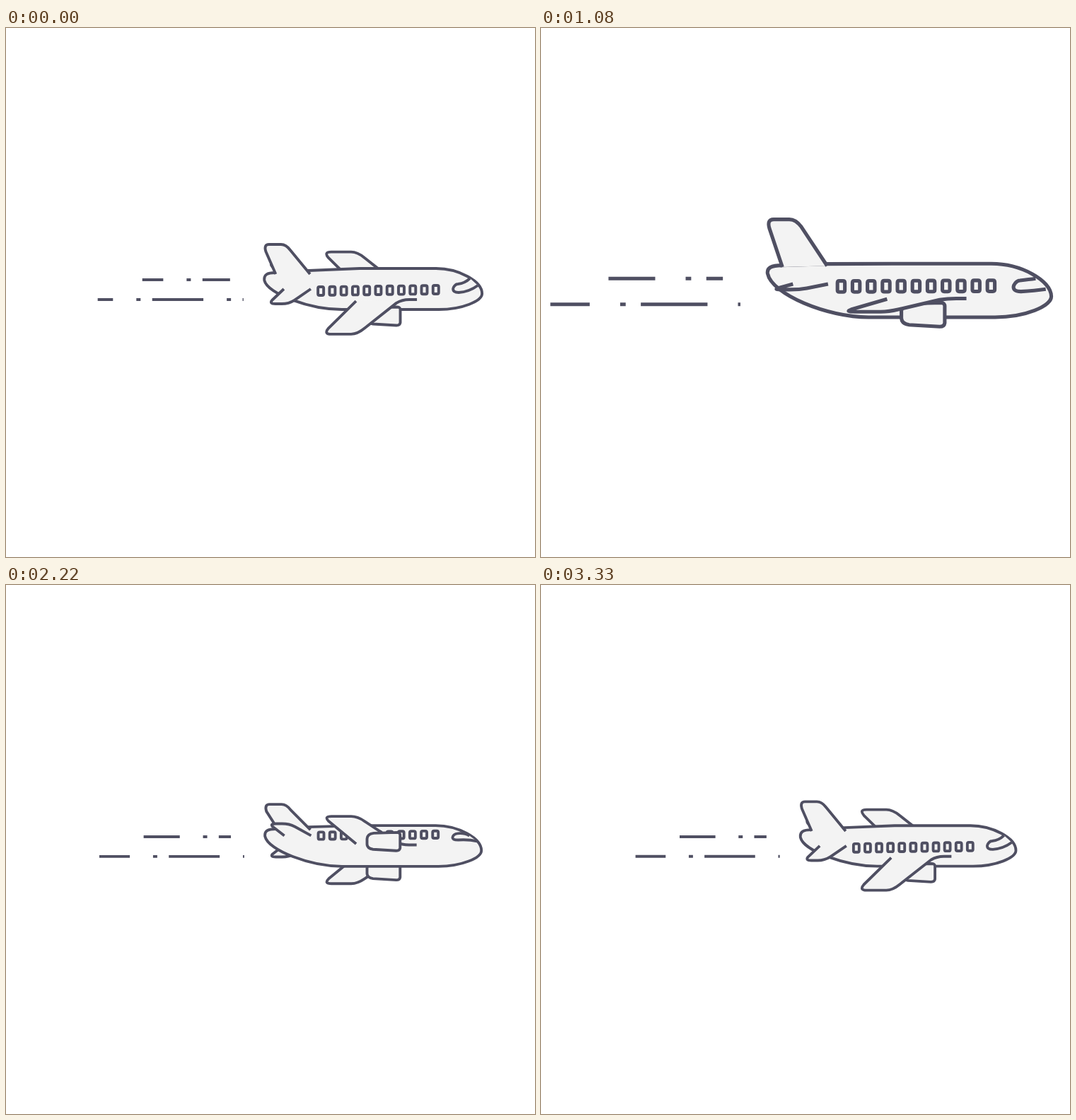
An HTML page that plays this animation: 748 by 748 pixels, repeating every 3360 ms.

```html
<!DOCTYPE html>
<html>
<head>
<meta charset="utf-8">
<title>Plane</title>
<style>
  html, body { margin: 0; height: 100%; overflow: hidden; background: #fff; }
  svg { display: block; width: 100%; height: 100%; }
  path { fill: #f3f3f3; stroke: #4f4f62; stroke-width: 3.9; stroke-linejoin: round; }
  .trail { stroke-dasharray: 72.3 33 6 16.4; }
</style>
</head>
<body>
<svg viewBox="0 0 748 748"><g id="plane"></g></svg>
<script>
const LOOP = 3360, HALF = LOOP / 2, LEVEL = 1290;
const plane = document.getElementById('plane');

function addPath(className = '') {
  const path = document.createElementNS('http://www.w3.org/2000/svg', 'path');
  path.setAttribute('class', className);
  plane.append(path);
  return path;
}

const upperTrail = addPath('trail'), lowerTrail = addPath('trail');
upperTrail.setAttribute('d', 'M193,356H317');
lowerTrail.setAttribute('d', 'M130,384H336');
const layers = Array.from({ length: 10 }, () => addPath());

// Cubic bezier timing (x1, 0, x2, 1), solved by bisection
function ease(x, x1 = 0.48, x2 = 0.52) {
  let lo = 0, hi = 1, t = 0.5;
  for (let i = 0; i < 22; i++) {
    t = (lo + hi) / 2;
    const guess = 3 * t * (1 - t) * ((1 - t) * x1 + t * x2) + t ** 3;
    if (guess < x) lo = t; else hi = t;
  }
  return t * t * (3 - 2 * t);
}

// Different reach for positive and negative roll
const reach = (q, up, down) => q * (q > 0 ? up : down);

function body(k) {
  return `M500,340H608C640,340 673,358 673,375.5C673,386 645,398 612,398H475
    C430,398 370,${372 + 4 * k} 365.5,${348 + 9 * k}
    C364.5,${343 + 6 * k} 369,${340 + 6 * k} 381,${340 + 6 * k}
    L428,${340 + 3 * k * k}Z`;
}

function cabin(q, k) {
  const h = 12 - 2 * Math.max(0, -q);
  let d = '';
  for (let i = 0; i < 11; i++) {
    const x = 441.2 + i * 16.25, y = 361.5 + 9.5 * q + k - 0.2 * k * i - h / 2;
    d += `M${x + 2},${y}h4q2,0 2,2v${h - 4}q0,2 -2,2h-4q-2,0 -2,-2v${4 - h}q0,-2 2,-2z`;
  }
  return d;
}

function cockpit(q, k) {
  const c = 362.5 + reach(q, 5.5, 8), r = 6 - Math.max(0, -q) * 1.7;
  return `M656,${357 - 3 * k}Q649,${c - r - 1} 639,${c - r}
    C635,${c - r} 632,${c - 1} 632,${c + 1}
    C632,${c + r - 1} 635,${c + r} 640,${c + r}
    Q655,${c + r - 1} 667,${369 + reach(q, -5, 8)}`;
}

function fin(q, k) {
  const top = 286 + reach(q, 20, -29);
  return `M381.5,${341.7 + 6.3 * Math.max(q, 0)}L367.5,${top + 10}
    Q364.5,${top} 372,${top}H389Q396,${top} 402,${top + 8}L430,${341.7 + 6.3 * k * k}`;
}

function elevator(q, y) {
  const root = 359 + reach(q, 10, 5.6), tip = 358.7 + reach(q, 31.3, 25.8), d = tip - root;
  return `M431,${y(root)}L408,${y(root + 0.75 * d)}Q400,${y(tip)} 390,${y(tip)}H381
    Q372,${y(tip)} 376.5,${y(tip - 0.25 * d)}L393,${y(root)}`;
}

function wing(q, y) {
  const root = 375 + 9 * q, tip = 374.8 + 58 * q, d = tip - root;
  return `M581,${y(root)}H570Q560,${y(root)} 552,${y(root + 0.1 * d)}
    L507,${y(root + 0.83 * d)}Q497,${y(tip)} 488,${y(tip)}H460
    Q449,${y(tip)} 456,${y(tip - 0.17 * d)}L495,${y(375 + 11 * q)}`;
}

function engine(q) {
  const t = 377 + reach(q, 17.5, 33), b = t + 26;
  return `M520,${t + 1}L553,${t}Q558,${t} 557.5,${t + 5}V${b - 4}Q557,${b} 552,${b}
    L519,${b - 2}Q511,${b - 3} 510.5,${b - 9}V${t + 9}Q511,${t + 2} 520,${t + 1}Z`;
}

const near = y => y, mirror = sum => y => sum - y;

function zoomAt(t) {
  const time = (t + 540) % LOOP, x = time % HALF / HALF;
  return 0.9165 + 0.3885 * (time < HALF ? ease(x, 0.47, 0.46) : 1 - ease(x, 0.56, 0.42));
}

// Roll from 1 through level flight to -1, then back the same way
function rollAt(t) {
  const time = t % HALF;
  const roll = time < LEVEL ? 1 - (time / LEVEL) ** 2 : -ease((time - LEVEL) / (HALF - LEVEL));
  return t < HALF ? roll : -roll;
}

function draw(t) {
  plane.setAttribute('transform',
    `translate(513.5 362) scale(${zoomAt(t)}) translate(-513.5 -362)`);

  const shift = 207 + 532.8 * ease(t % 1120 / 1120);
  lowerTrail.style.strokeDashoffset = 130 - shift;
  upperTrail.style.strokeDashoffset = 122 - shift;

  const q = rollAt(t), k = Math.abs(q);
  const nearParts = [engine(q), wing(q, near)];
  if (q <= 0) nearParts.reverse();
  [
    elevator(q, mirror(722)), wing(q, mirror(749.5)), engine(-q),
    body(k), cabin(q, k), cockpit(q, k), fin(q, k), elevator(q, near),
    ...nearParts
  ].forEach((d, i) => layers[i].setAttribute('d', d));
}

function tick() {
  draw(performance.now() % LOOP);
  requestAnimationFrame(tick);
}
tick();
</script>
</body>
</html>
```
